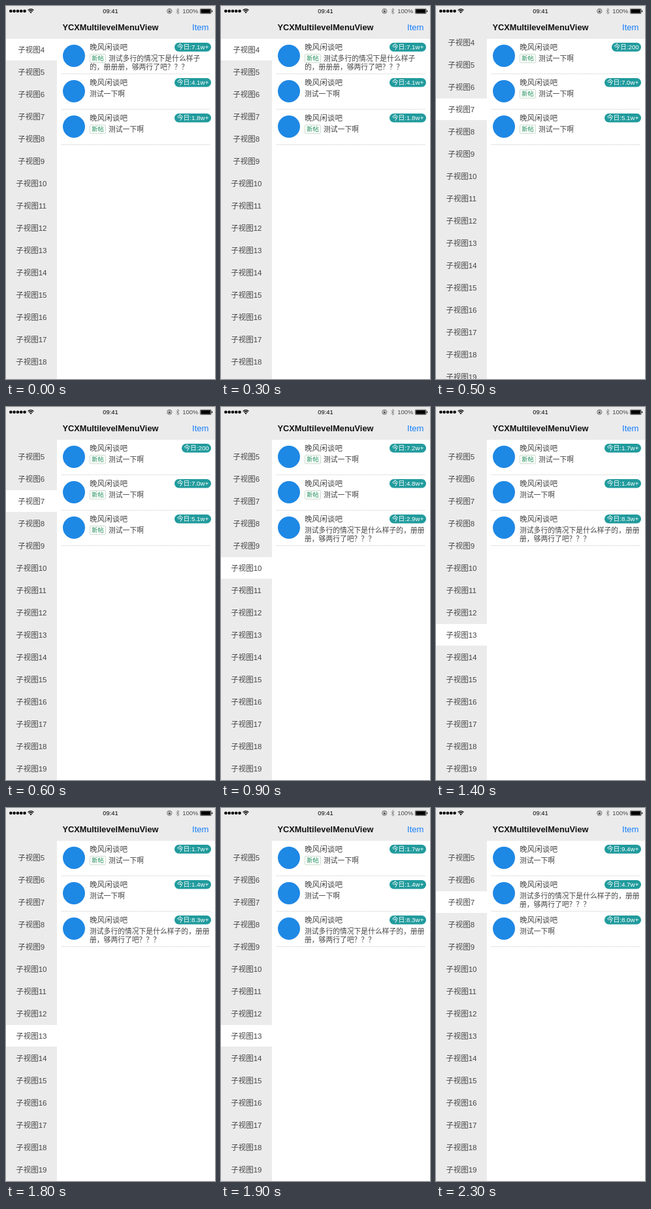
An HTML page that plays this animation: 320 px wide and 569 px high, repeating every 2.4 s.

```html
<!DOCTYPE html>
<html lang="zh-CN">
<head>
<meta charset="utf-8">
<title>YCXMultilevelMenuView</title>
<style>
html, body { margin: 0; width: 100%; height: 100%; overflow: hidden; background: #fff; }
svg { display: block; width: 100vw; height: 100vh; }
text { font-family: "Liberation Sans", "Noto Sans CJK SC", "Noto Sans CJK", sans-serif; font-weight: 300; }
</style>
</head>
<body>
<svg id="stage" viewBox="0 0 320 569"></svg>
<script>
const NS = 'http://www.w3.org/2000/svg';
const LOOP = 2400, ROW = 34, TOP = 50, CELL = 54;
const INK = '#444';
const stage = document.getElementById('stage');

function add(parent, tag, attrs, text) {
  const el = document.createElementNS(NS, tag);
  for (const k in attrs) el.setAttribute(k, attrs[k]);
  if (text) el.textContent = text;
  parent.appendChild(el);
  return el;
}
const rect = (p, x, y, width, height, fill, more) =>
  add(p, 'rect', { x, y, width, height, fill, ...more });

// y is the middle of the line
function label(p, x, y, size, fill, text, more) {
  return add(p, 'text', { x, y: y + size * 0.37, 'font-size': size, fill, ...more }, text);
}
const middle = { 'text-anchor': 'middle' };

// Each page: three posts of [count, has tag, is long]
const pages = [
  [['7.1w+', 1, 1], ['4.1w+', 0, 0], ['1.8w+', 1, 0]],
  [['200', 1, 0], ['7.0w+', 1, 0], ['5.1w+', 1, 0]],
  [['7.2w+', 1, 0], ['4.8w+', 1, 0], ['2.9w+', 0, 1]],
  [['1.7w+', 1, 0], ['1.4w+', 0, 0], ['8.3w+', 0, 1]],
  [['9.4w+', 0, 0], ['4.7w+', 0, 1], ['8.0w+', 0, 0]]
];

// [start ms, page, selected item, scroll]
const steps = [
  [0, 0, 4, 0],
  [500, 1, 7, 11],
  [600, 1, 7, 25],
  [800, 2, 10, 25],
  [1200, 3, 13, 25],
  [2000, 4, 7, 25]
];

const LONG = '测试多行的情况下是什么样子的，册册册，够两行了吧？？？';

function drawPost(page, [count, tag, long], i) {
  const g = add(page, 'g', { transform: `translate(0 ${TOP + i * CELL})` });
  add(g, 'circle', { cx: 104, cy: 26, r: 17, fill: '#1e88e5' });
  label(g, 128, 12.5, 11.6, INK, '晚风闲谈吧');

  const width = count === '200' ? 45 : 56;
  rect(g, 314 - width, 6, width, 13.5, '#219b9d', { rx: 6.5 });
  label(g, 314 - width / 2, 12.7, 9.8, '#fff', '今日:' + count, middle);

  const x = tag ? 157 : 128;
  if (tag) {
    rect(g, 128.5, 23.5, 24, 13, '#fff', { rx: 1.5, stroke: '#bfd3c2', 'stroke-width': 0.8 });
    label(g, 140.5, 30, 9.3, '#23905c', '新帖', middle);
  }
  if (long) {
    const cut = tag ? 13 : 17;
    label(g, x, 30.2, 10.8, INK, LONG.slice(0, cut));
    label(g, 128, 43.2, 10.8, INK, LONG.slice(cut));
  } else {
    label(g, x, 30.2, 10.8, INK, '测试一下啊');
  }
  add(g, 'path', { d: 'M85 53.5H313', stroke: '#c8c8c8', 'stroke-width': 0.8, 'stroke-dasharray': '1.5 1' });
}

rect(stage, 0, 0, 320, 569, '#fff');
const pageEls = pages.map(posts => {
  const g = add(stage, 'g', {});
  posts.forEach((post, i) => drawPost(g, post, i));
  return g;
});

rect(stage, 0, TOP, 78, 519, '#ebebeb');
const menu = add(stage, 'g', {});
const marker = rect(menu, 0, 0, 78, 33, '#fff');
for (let n = 4; n < 20; n++) {
  label(menu, 38.8, TOP + (n - 4) * ROW + 17, 11.5, INK, '子视图' + n, middle);
}

function drawHeader() {
  const g = add(stage, 'g', {});
  rect(g, 0, 0, 320, TOP, '#ebebeb');
  for (let i = 0; i < 5; i++) add(g, 'circle', { cx: 7.3 + i * 5.3, cy: 7.7, r: 2.3, fill: '#000' });
  add(g, 'path', {
    d: 'M33.6 6.6Q38 2.6 42.4 6.6M35.2 8.3Q38 5.8 40.8 8.3',
    fill: 'none', stroke: '#000', 'stroke-width': 1.3
  });
  add(g, 'path', { d: 'M36.4 9.5Q38 8.2 39.6 9.5L38 11.2Z' });
  label(g, 160, 8, 9.4, '#000', '09:41', middle);

  add(g, 'circle', { cx: 250.3, cy: 7.8, r: 3.6, fill: 'none', stroke: '#444', 'stroke-width': 0.8 });
  rect(g, 248.7, 7.4, 3.2, 2.3, '#444');
  add(g, 'path', { d: 'M249.3 7.5V6.6a1 1 0 0 1 2 0V7.5', fill: 'none', stroke: '#444', 'stroke-width': 0.7 });
  add(g, 'path', {
    d: 'M260.6 5.6L265.2 10.1L262.9 12.2V3.6L265.2 5.7L260.6 10.2',
    fill: 'none', stroke: '#777', 'stroke-width': 0.8
  });
  label(g, 270.3, 7.4, 9.4, '#444', '100%');
  rect(g, 297.4, 4.2, 16.8, 7.4, 'none', { rx: 1, stroke: '#000', 'stroke-width': 0.6 });
  rect(g, 298.3, 5, 15, 5.8, '#000');
  rect(g, 315, 6.6, 1.2, 2.6, '#000', { rx: 0.6 });

  label(g, 160, 32.6, 12.8, '#111', 'YCXMultilevelMenuView', { ...middle, style: 'font-weight:700' });
  label(g, 285, 32.6, 13.1, '#157efb', 'Item');
}
drawHeader();

let shown;
function show(step) {
  if (step === shown) return;
  shown = step;
  const [, page, item, scroll] = step;
  pageEls.forEach((el, i) => el.setAttribute('visibility', i === page ? 'visible' : 'hidden'));
  marker.setAttribute('y', TOP + (item - 4) * ROW);
  menu.setAttribute('transform', `translate(0 ${-scroll})`);
}

const start = performance.now();
function tick() {
  const t = Math.max(0, performance.now() - start) % LOOP;
  show(steps.filter(s => s[0] <= t).pop());
  requestAnimationFrame(tick);
}
show(steps[0]);
requestAnimationFrame(tick);
</script>
</body>
</html>
```
